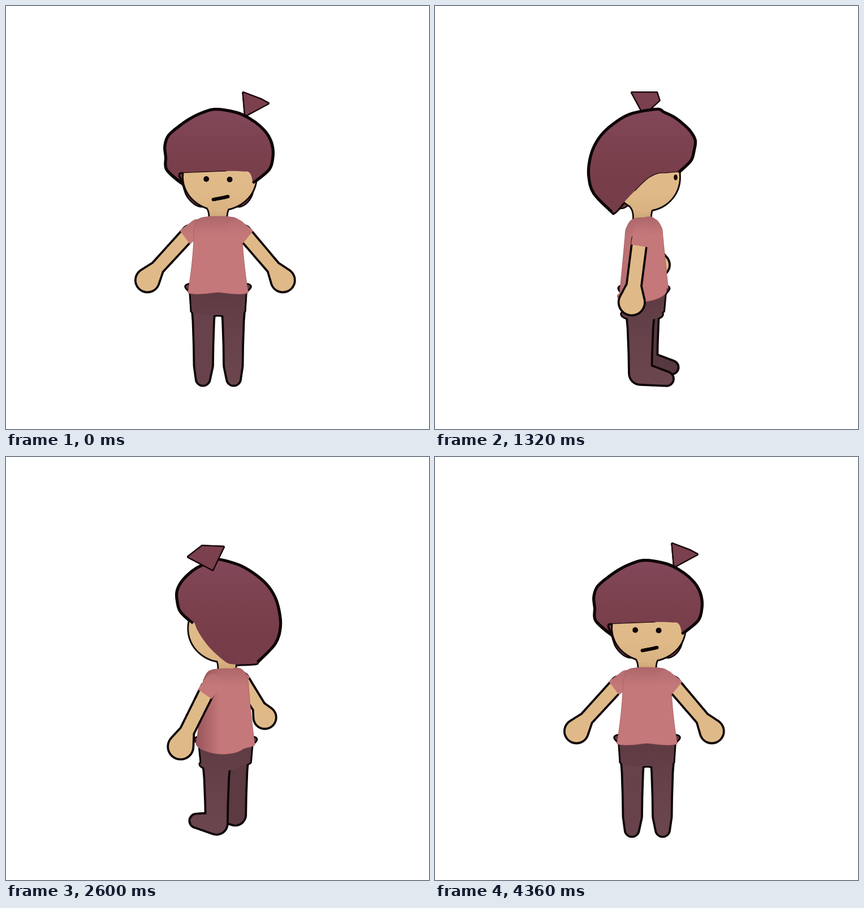
An HTML page with a canvas that plays this animation: 748 px wide and 748 px high, repeating every 4440 ms.

```html
<!DOCTYPE html>
<html lang="en">
<head>
<meta charset="utf-8">
<title>Turnaround</title>
<style>
html, body { margin: 0; width: 100%; height: 100%; overflow: hidden; background: #fff; }
canvas { display: block; width: 100vw; height: 100vh; }
</style>
</head>
<body>
<canvas id="stage" width="748" height="748"></canvas>
<script>
const g = document.getElementById('stage').getContext('2d');
const AXIS = 379, HORIZON = 73, DIST = 1500, TAU = Math.PI * 2;
const INK = '#0e0507', SKIN = '#dfba88';
let turn = 0, co = 1, si = 0;

const clamp = v => Math.max(0, Math.min(1, v));
const bump = (a, center, sharp) => Math.exp(sharp * (Math.cos(a - center) - 1));
const steps = (n, make) => Array.from({ length: n + 1 }, (_, i) => make(i / n));

// Local x (side), y (screen height), z (front) to [screen x, screen y, depth]
function project(x, y, z) {
  const d = z * co - x * si, k = DIST / (DIST - d);
  return [AXIS + (x * co + z * si) * k, HORIZON + (y - HORIZON) * k, d];
}

// Smooth path through points
function curve(pts, closed) {
  const path = new Path2D(), n = pts.length;
  const at = i => pts[Math.max(0, Math.min(n - 1, i))];
  path.moveTo(pts[0][0], pts[0][1]);
  for (let i = 0; i < n - 1; i++) {
    const [a, b, c, d] = [at(i - 1), at(i), at(i + 1), at(i + 2)];
    path.bezierCurveTo(b[0] + (c[0] - a[0]) / 6, b[1] + (c[1] - a[1]) / 6,
      c[0] - (d[0] - b[0]) / 6, c[1] - (d[1] - b[1]) / 6, c[0], c[1]);
  }
  if (closed) path.closePath();
  return path;
}

function fill(path, color) { g.fillStyle = color; g.fill(path); }
function stroke(path, width, color = INK) {
  g.strokeStyle = color;
  g.lineWidth = width;
  g.stroke(path);
}
function fade(y0, y1, ...colors) {
  const grad = g.createLinearGradient(0, y0, 0, y1);
  colors.forEach((c, i) => grad.addColorStop(i / (colors.length - 1), c));
  return grad;
}

// A hollow form given by its side profile [[radius, y], ...] at each azimuth
function shell(profile, ox, oz, crown = [], lift = 0) {
  const place = (a, [r, y]) => project(ox + r * Math.cos(a), y, oz + r * Math.sin(a));
  const side = a => profile(a).map(p => place(a, p));
  const rim = dir => steps(16, u => {
    const a = turn + Math.PI * (1 - dir * u);
    const [x, y] = place(a, profile(a).pop());
    return [x, y - lift * Math.max(0, Math.sin(a - turn)), a];
  });
  const edge = [...side(turn).reverse(), ...crown, ...side(turn + Math.PI)];
  const front = rim(1), back = rim(-1);
  return {
    edge: curve(edge),
    rim: front,
    front: curve([...edge, ...front.slice(1)], true),
    back: curve([...edge, ...back.slice(1)], true)
  };
}

// Half extent of a boxy oval seen at azimuth a
const oval = (w, d, a) =>
  (Math.abs(w * Math.cos(a)) ** 1.5 + Math.abs(d * Math.sin(a)) ** 1.5) ** (2 / 3);

// Short fringe in front, long at the back, lobed on the front left
function hairProfile(a) {
  const width = 97 - 10 * Math.sin(a) - 2 * Math.cos(a) - 11 * bump(a, .9, 5);
  const end = 294 + 70 * clamp((.3 - Math.sin(a)) / 1.1);
  const lobes = 4 * bump(a, 2.4, 1.5), flare = 14 * bump(a, 2.8, 8);
  return steps(8, u => u ** 1.5).slice(1).map(v => {
    const y = 183 + (end - 183) * v;
    const dome = width * Math.sin(.68 * Math.PI * v ** .62) * (1 - .27 * v ** 10);
    return [dome + lobes * Math.cos((y - 235) / 57 * TAU) + flare * v ** 10, y];
  });
}

function shirtProfile(a) {
  return steps(8, u => {
    const round = Math.sqrt(1 - (1 - clamp(u * 5)) ** 2), s = Math.sin(a);
    const hem = 507 - 5 * s - 5 * s * s;
    return [oval(28 + 14 * round + 11 * u * u, 16 + 12 * round + 12 * u, a), 376 + (hem - 376) * u];
  });
}

const hipProfile = a => steps(3, u => [oval(50 - 3 * u, 36 - 4 * u, a), 495 + 44 * u]);

// Tube of circles through nodes [x, y, z, radius]
function tube(nodes, grow) {
  const path = new Path2D();
  for (let i = 0; i < nodes.length - 1; i++) {
    for (let j = 0; j <= 30; j++) {
      const [x, y, z, r] = nodes[i].map((v, n) => v + (nodes[i + 1][n] - v) * j / 30);
      const p = project(x, y, z), size = r * DIST / (DIST - p[2]) + grow;
      path.moveTo(p[0] + size, p[1]);
      path.arc(p[0], p[1], size, 0, TAU);
    }
  }
  return path;
}
function limb(nodes, color) {
  fill(tube(nodes, 3.8), INK);
  fill(tube(nodes, 0), color);
}

function tuft() {
  const tip = project(45, 195, -19);
  const rim = [[44, 156, 5], [42, 156, -40], [74, 168, -38], [84, 172, 2]].map(p => project(...p));
  const faces = [rim, ...rim.map((p, i) => [p, rim[(i + 1) % 4], tip])].map(pts => {
    const path = new Path2D();
    pts.forEach(p => path.lineTo(p[0], p[1]));
    path.closePath();
    return path;
  });
  faces.forEach(f => stroke(f, 5, '#1c090e'));
  faces.forEach(f => fill(f, '#7a404d'));
}

function dot(x, y, z, r, least) {
  const [px, py, d] = project(x, y, z);
  if (d < least) return;
  g.beginPath();
  g.ellipse(px, py, r * Math.min(1, 1.1 * d / Math.hypot(x, z)), r, 0, 0, TAU);
  g.fillStyle = INK;
  g.fill();
}

function head() {
  const hair = shell(hairProfile, 0, 0, [project(-8, 182, 15)], 10);
  const tuftBehind = -45 * si - 19 * co < 12;
  if (tuftBehind) tuft();

  stroke(hair.back, 5);
  fill(hair.back, '#6e3844');
  stroke(hair.front, 6);

  const [nx] = project(-4, 365, -12), neck = new Path2D();
  neck.moveTo(nx - 21, 354);
  neck.quadraticCurveTo(nx - 13, 362, nx - 15, 382);
  neck.lineTo(nx + 15, 382);
  neck.quadraticCurveTo(nx + 13, 362, nx + 21, 354);
  const face = new Path2D(), [fx, fy] = project(-1, 303, -5);
  face.ellipse(fx, fy, Math.hypot(64 * co, 58 * si), 58, 0, 0, TAU);
  stroke(neck, 5.5);
  stroke(face, 5.5);
  fill(neck, fade(358, 380, '#dcb685', '#c9a273'));
  fill(face, fade(290, 362, '#e0bb89', '#dfba88', '#d9b281'));

  fill(hair.front, fade(182, 370, '#82485a', '#7c424f', '#773e4a', '#753d49'));
  const fringe = hair.rim.filter(p => bump(p[2], 2.35, 1) > .56);
  if (fringe.length > 1) stroke(curve(fringe), 1.3, '#2a1015');
  stroke(hair.edge, 4.5);

  dot(-24, 298, 51, 5, 8);
  dot(16, 299, 50, 5, 8);
  steps(20, u => dot(25 * u - 12, 334 - 5 * u, 46, 3, 23));
  if (!tuftBehind) tuft();
}

const sideX = (s, a) => s * a - 5 - a * .035;

function arm(s) {
  limb([[sideX(s, 48), 402, -6, 11], [sideX(s, 104), 465, -4, 10.5], [sideX(s, 120), 486, -4, 19.5]], SKIN);
  const a = project(sideX(s, 34), 393, -6), b = project(sideX(s, 56), 410, -5);
  const sleeve = new Path2D(), cap = new Path2D();
  sleeve.moveTo(a[0], a[1]);
  sleeve.lineTo(b[0], b[1]);
  cap.arc(a[0], a[1], 15, 0, TAU);
  const tone = fade(376, 405, '#b56d70', '#c47879');
  stroke(sleeve, 30, tone);
  fill(cap, tone);
}

function leg(s, color) {
  const x = s * 26.5 - 3.5, wide = 1 + .2 * Math.abs(si);
  limb([[x, 522, -10, 20 * wide], [x, 560, -10, 17 * wide], [x, 605, -10, 15.5 * wide],
    [x, 639, -10, 15 * wide], [x, 645, 36, 10.5]], color);
}

function body() {
  const near = si > 0 ? -1 : 1;
  const cloth = fade(508, 670, '#5e3b43', '#67424a', '#6c464d');
  arm(-near);

  const hips = shell(hipProfile, -4, -9);
  stroke(hips.front, 6);
  leg(-near, `hsl(347 22% ${33 - 5 * Math.abs(si)}%)`);
  leg(near, cloth);
  fill(hips.front, cloth);

  const shirt = shell(shirtProfile, -4, -9);
  stroke(shirt.front, 1.5, '#a25c62');
  fill(shirt.front, fade(375, 405, '#b0686b', '#c47879'));

  // Soft shade under the nearer arm
  const [mid] = project(-4, 440, -9), reach = near * Math.sign(co) * 52;
  const shade = g.createLinearGradient(mid + reach, 0, mid + reach * .2, 0);
  shade.addColorStop(0, `rgba(95,40,52,${.45 * Math.abs(2 * si * co)})`);
  shade.addColorStop(1, 'rgba(95,40,52,0)');
  fill(shirt.front, shade);
  arm(near);
}

function draw(now) {
  const t = Math.floor(now % 4440 / 40) * 40;
  const u = Math.min(1, t / 4360);
  turn = TAU * u * u * (3 - 2 * u);
  co = Math.cos(turn);
  si = Math.sin(turn);
  g.clearRect(0, 0, 748, 748);
  g.lineJoin = 'round';
  head();
  body();
}

const start = performance.now();
function tick() {
  draw(performance.now() - start);
  requestAnimationFrame(tick);
}
tick();
</script>
</body>
</html>
```
